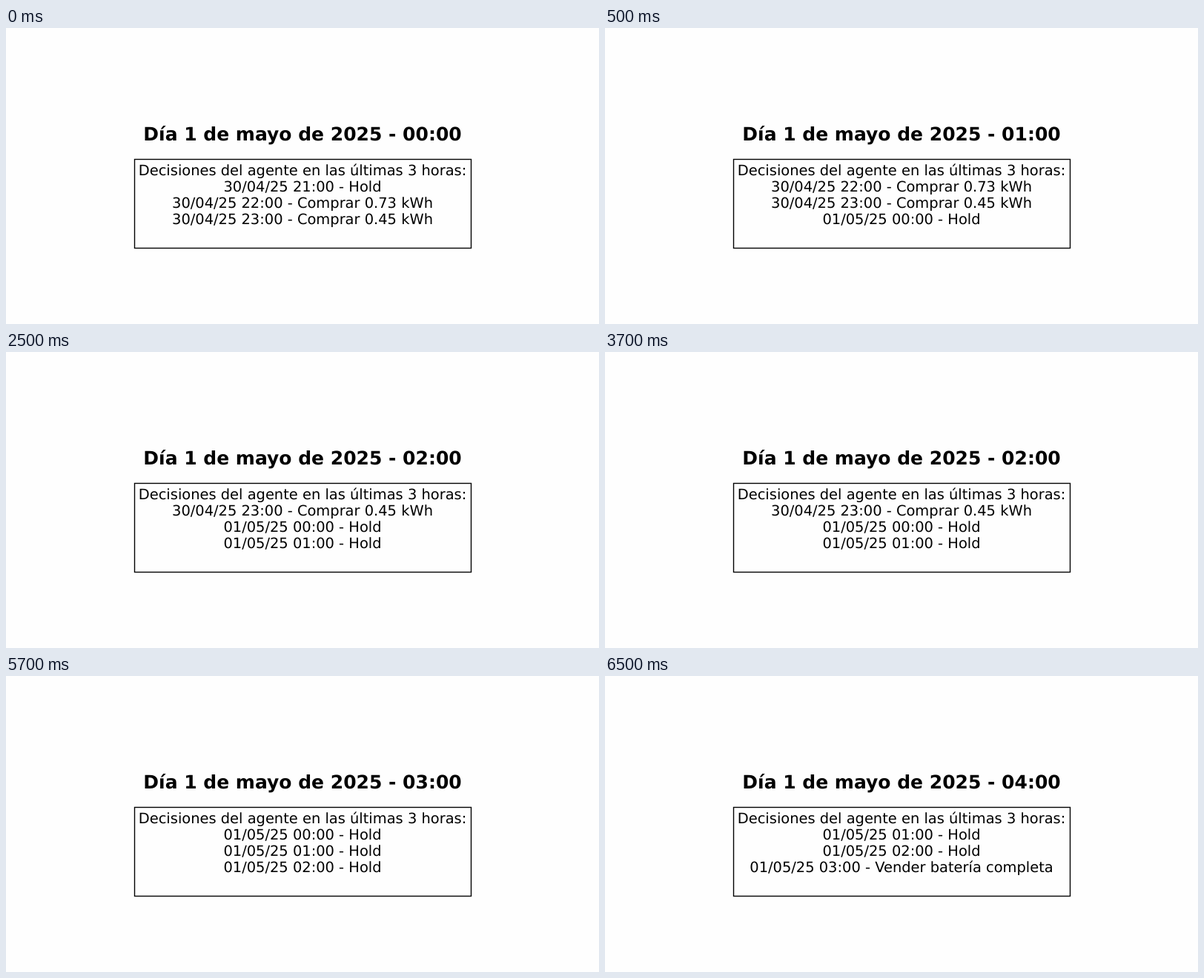
An HTML page that plays this animation: 800 by 400 pixels, repeating every 8000 ms.

```html
<!DOCTYPE html>
<html lang="es">
<head>
<meta charset="utf-8">
<title>Decisiones del agente</title>
<style>
  html, body { margin: 0; width: 100%; height: 100%; overflow: hidden; background: #fefefe; }
  svg { display: block; width: 800px; height: 400px; }
  text {
    font: 19.44px "DejaVu Sans", Verdana, sans-serif;
    text-anchor: middle;
    text-rendering: geometricPrecision;
    fill: #000;
  }
  #title { font-size: 25px; font-weight: bold; }
  rect { fill: none; stroke: #000; stroke-width: 1.39px; }
</style>
</head>
<body>
<svg viewBox="0 0 800 400">
  <text id="title" x="400" y="152"></text>
  <rect x="173.5" y="177.5" width="454" height="120"/>
  <text x="400" y="199">Decisiones del agente en las últimas 3 horas:</text>
  <text class="line" x="400" y="221"></text>
  <text class="line" x="400" y="243"></text>
  <text class="line" x="400" y="265"></text>
</svg>
<script>
  const LOOP = 8000;
  const starts = [0, 500, 2500, 4500, 6500];
  const log = [
    "30/04/25 21:00 - Hold",
    "30/04/25 22:00 - Comprar 0.73 kWh",
    "30/04/25 23:00 - Comprar 0.45 kWh",
    "01/05/25 00:00 - Hold",
    "01/05/25 01:00 - Hold",
    "01/05/25 02:00 - Hold",
    "01/05/25 03:00 - Vender batería completa"
  ];
  const title = document.getElementById("title");
  const lines = document.querySelectorAll(".line");
  let shown = -1;

  function show(hour) {
    if (hour === shown) return;
    shown = hour;
    title.textContent = `Día 1 de mayo de 2025 - 0${hour}:00`;
    lines.forEach((line, i) => { line.textContent = log[hour + i]; });
  }

  const begin = performance.now();
  function tick(now) {
    const t = Math.max(0, now - begin) % LOOP;
    show(starts.filter(s => s <= t).length - 1);
    requestAnimationFrame(tick);
  }
  show(0);
  requestAnimationFrame(tick);
</script>
</body>
</html>
```
